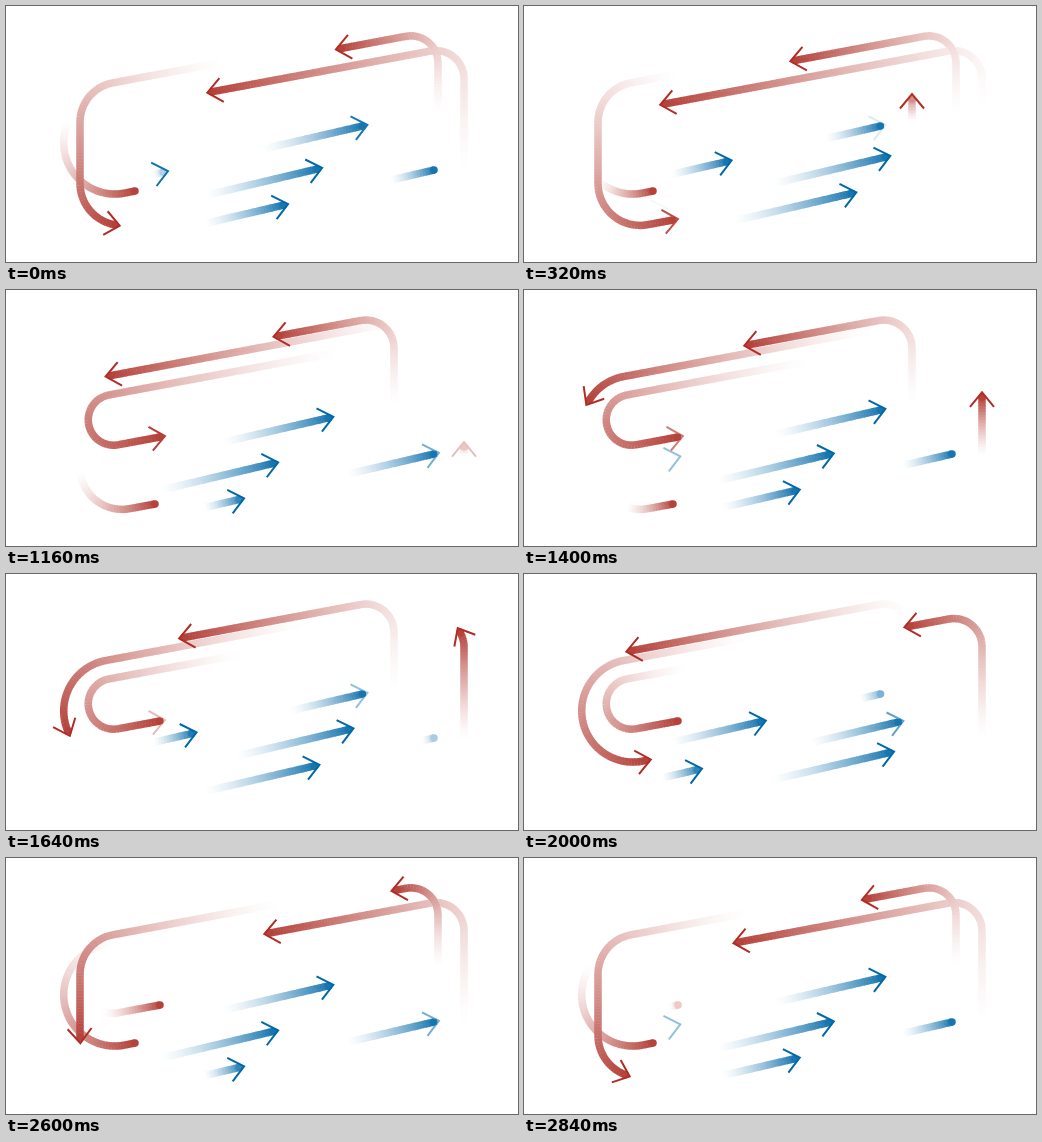
Write an HTML page with a canvas that moves like this. It is 512 by 256 pixels and loops after 2.88 s.

```html
<!DOCTYPE html>
<html lang="en">
<head>
<meta charset="utf-8">
<title>Flowing arrows</title>
<style>
  html, body { margin: 0; width: 100%; height: 100%; overflow: hidden; background: #fff; }
  canvas { display: block; width: 512px; height: 256px; }
</style>
</head>
<body>
<canvas id="stage" width="512" height="256"></canvas>
<script>
const ctx = document.getElementById('stage').getContext('2d');
const LOOP = 2880, FRAME = 40, TIP = 5;
const RED = { body: [176, 54, 46], head: [178, 44, 38], period: LOOP, ramp: 28 };
const BLUE = { body: [8, 108, 170], head: [0, 104, 166], period: LOOP / 2, speed: 0.1613, ramp: 16 };

// at: distance of the tip along the path at time 0; speed: pixels per ms;
// trail: length of the fading body; fade: time the head takes to vanish at the end.
const flows = [
  { ...RED, at: 169.9, speed: 0.202, trail: 300, fade: 460,
    d: 'M432 108V57A27 27 0 0 0 400 30.3L97.8 86.9A51.2 51.2 0 0 0 116.6 187.5L129 185' },
  { ...RED, at: 370, speed: 0.207, trail: 374, fade: 800,
    d: 'M458 166V72.5A28 28 0 0 0 424.8 45L101.2 105.3A25.4 25.4 0 0 0 110.6 155.1L154 147' },
  { ...RED, at: -36, speed: 0.2, trail: 292, fade: 750,
    d: 'M388 116V58A28 28 0 0 0 354.8 30.5L106.6 76.9A40 40 0 0 0 74 116.2V177.4A42 42 0 0 0 123.7 218.7L149 214' },
  { ...BLUE, at: 15.4, speed: 0.1463, trail: 114, fade: 420, d: 'M147 168.5L356.5 120' },
  { ...BLUE, at: 183, trail: 121, fade: 400, d: 'M138 204L374.5 148' },
  { ...BLUE, at: 86.3, trail: 127, fade: 430, d: 'M198 217.7L428 164' }
];

for (const flow of flows) {
  flow.path = document.createElementNS('http://www.w3.org/2000/svg', 'path');
  flow.path.setAttribute('d', flow.d);
  flow.length = flow.path.getTotalLength();
}

const clamp = (v, lo = 0, hi = 1) => Math.min(hi, Math.max(lo, v));
const tint = (rgb, a) => `rgb(${rgb.map(c => Math.round(255 + (c - 255) * a))})`;

function drawBody(flow, from, to) {
  const span = to - from;
  const peak = Math.min(0.94, 0.1 + span / 50);
  const steps = Math.ceil(span / 3);
  const point = s => flow.path.getPointAtLength(from + span * s);
  ctx.lineWidth = 7.5;
  ctx.lineCap = 'butt';
  let a = point(0);
  for (let i = 0; i < steps; i++) {
    const b = point(Math.min(1, (i + 1.15) / steps));
    ctx.strokeStyle = tint(flow.body, peak * ((i + 0.5) / steps) ** 1.4);
    ctx.beginPath();
    ctx.moveTo(a.x, a.y);
    ctx.lineTo(b.x, b.y);
    ctx.stroke();
    a = point((i + 1) / steps);
  }
  ctx.fillStyle = tint(flow.body, peak);
  ctx.beginPath();
  ctx.arc(a.x, a.y, 3.75, 0, Math.PI * 2);
  ctx.fill();
}

function drawHead(flow, end, alpha) {
  const base = Math.max(0, end - 1);
  const p = flow.path.getPointAtLength(base);
  const q = flow.path.getPointAtLength(base + 1);
  ctx.save();
  ctx.translate(q.x, q.y);
  ctx.rotate(Math.atan2(q.y - p.y, q.x - p.x));
  ctx.lineWidth = 2;
  ctx.strokeStyle = tint(flow.head, alpha);
  ctx.beginPath();
  ctx.moveTo(TIP - 14.5, -12);
  ctx.lineTo(TIP, 0);
  ctx.lineTo(TIP - 14.5, 12);
  ctx.stroke();
  ctx.restore();
}

function drawFlow(flow, time) {
  for (let lap = -2; lap < 3; lap++) {
    const tip = flow.at + flow.speed * (time + lap * flow.period);
    const tail = Math.max(0, tip - flow.trail);
    if (tip <= 0 || tail >= flow.length) continue;
    const end = clamp(tip - TIP, 0, flow.length);
    const overtime = Math.max(0, tip - TIP - flow.length) / flow.speed;
    const alpha = clamp(tip / flow.ramp) ** 1.7 * clamp(1 - overtime / flow.fade);
    if (end - tail > 4.6) drawBody(flow, tail, end);
    if (alpha > 0) drawHead(flow, end, alpha);
  }
}

const start = performance.now();
function render() {
  const elapsed = Math.max(0, performance.now() - start) % LOOP;
  const time = Math.floor(elapsed / FRAME) * FRAME;
  ctx.globalCompositeOperation = 'source-over';
  ctx.fillStyle = '#fff';
  ctx.fillRect(0, 0, 512, 256);
  // Darken keeps overlapping trails and segment joints seamless.
  ctx.globalCompositeOperation = 'darken';
  for (const flow of flows) drawFlow(flow, time);
  requestAnimationFrame(render);
}
render();
</script>
</body>
</html>
```
